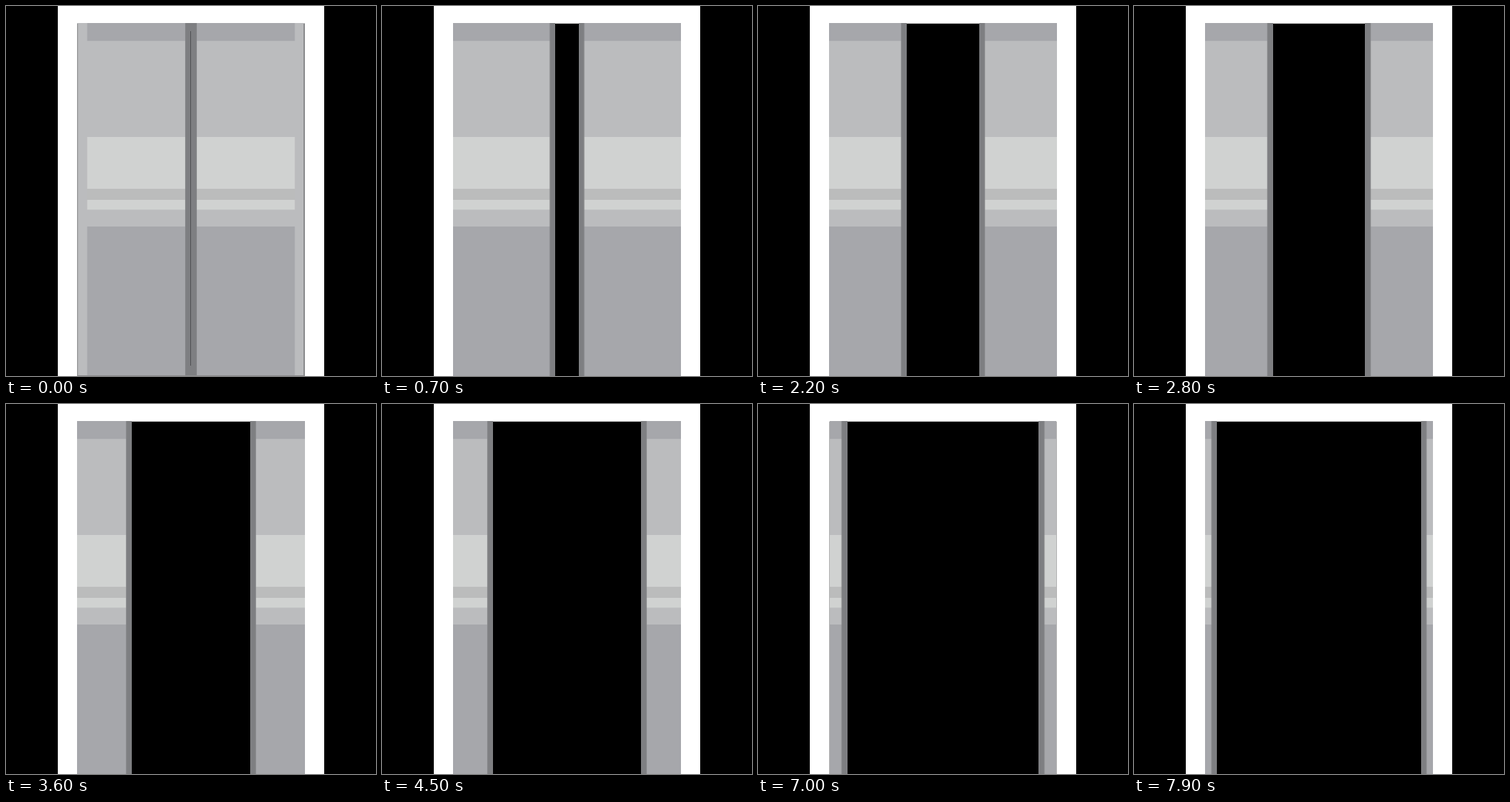
Write an HTML page that moves like this. It is 500 px wide and 500 px high and loops after 8000 ms.

```html
<!DOCTYPE html>
<html lang="en">
<head>
<meta charset="utf-8">
<title>Sliding doors</title>
<style>
  html, body { margin: 0; width: 100%; height: 100%; overflow: hidden; background: #000; }
  svg { display: block; width: 100vw; height: 100vh; }
  .slide { animation: open 8s infinite; }
  .closed { animation: closed 8s step-end infinite; }

  /* fast opening, then a slower finish, ten steps a second */
  @keyframes open {
    0% { transform: translateX(0); animation-timing-function: steps(50); }
    62.5% { transform: translateX(-111px); animation-timing-function: steps(30); }
    100% { transform: translateX(-138.5px); }
  }
  @keyframes closed {
    0% { opacity: 1; }
    1.25%, 100% { opacity: 0; }
  }
</style>
</head>
<body>
<svg viewBox="0 0 500 500">
  <defs>
    <clipPath id="opening"><rect x="96.7" y="23.8" width="306.6" height="477"/></clipPath>
    <g id="door">
      <rect x="96" y="23" width="154" height="478" fill="#bbbcbe"/>
      <rect x="109.7" y="23" width="133" height="24.2" fill="#a6a7ab"/>
      <rect x="109.7" y="177" width="133" height="70" fill="#d0d2d1"/>
      <rect x="109.7" y="247" width="133" height="15" fill="#bbbcbc"/>
      <rect x="109.7" y="262" width="133" height="13.2" fill="#d0d2d1"/>
      <rect x="109.7" y="298" width="133" height="203" fill="#a6a7ab"/>
      <rect x="242.2" y="23" width="7.8" height="478" fill="#7e7f82"/>
    </g>
  </defs>

  <rect width="500" height="500"/>
  <path d="M70 0H430V500H403.3V23.8H96.7V500H70Z" fill="#fff"/>

  <g clip-path="url(#opening)">
    <g class="slide"><use href="#door"/></g>
    <g transform="translate(500 0) scale(-1 1)">
      <g class="slide"><use href="#door"/></g>
    </g>
  </g>

  <!-- outlines seen only while shut -->
  <g class="closed">
    <rect x="249" y="34" width="1" height="452" fill="#505154"/>
    <rect x="96.2" y="24" width="1" height="476" fill="#8c8c8e"/>
    <rect x="402.4" y="24" width="1.1" height="476" fill="#666668"/>
    <rect x="97" y="499" width="306" height="1" fill="#8c8c8e"/>
  </g>
</svg>
</body>
</html>
```
